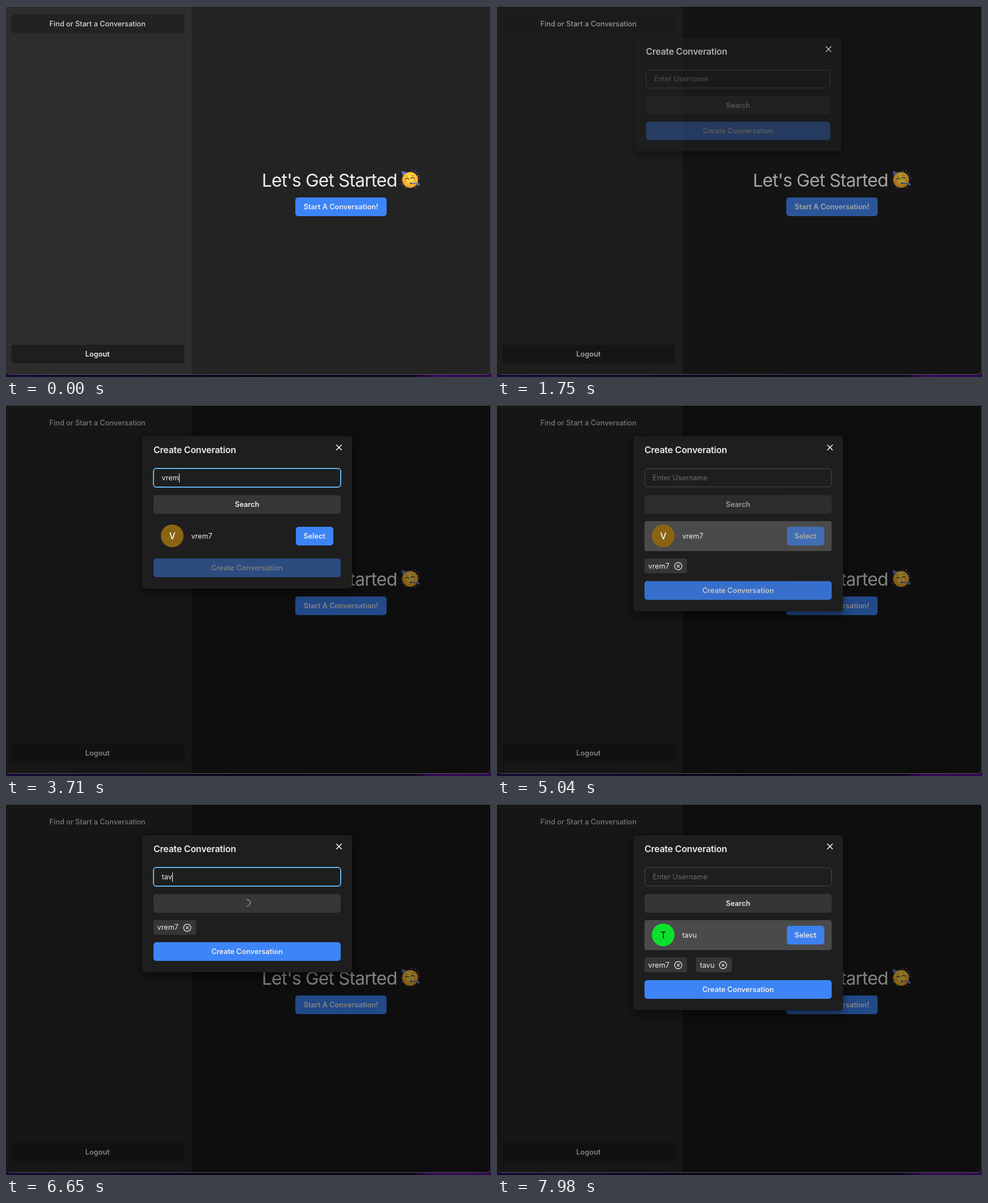
An HTML page that plays this animation: 855 by 655 pixels, repeating every 8 s.

```html
<!DOCTYPE html>
<html lang="en">
<head>
<meta charset="utf-8">
<title>Create conversation</title>
<style>
  * { box-sizing: border-box; }
  html, body { margin: 0; width: 100%; height: 100%; overflow: hidden; }
  body {
    position: relative;
    background: linear-gradient(90deg, #150b36, #0b0618 50%, #10061f 84%, #380a58 88%, #300850);
    font: 400 12.7px/1.5 Inter, sans-serif; color: #ededed; white-space: nowrap;
  }
  .abs { position: absolute; }
  .button {
    display: flex; align-items: center; justify-content: center;
    height: 33px; border-radius: 5px; font-weight: 600;
  }
  .blue { background: #3d84f7; }
  #window { left: 0; top: 0; width: 855px; height: 651px; border-radius: 0 0 8px 8px; overflow: hidden; }
  #frame { inset: 0; border: 1px solid #555; border-left: 0; border-radius: 0 3px 8px 8px; }
  #sidebar { left: 0; top: 0; width: 326.5px; height: 651px; }
  #sidebar .button { left: 9px; width: 304.5px; }
  #find { top: 15px; font-weight: 500; color: #d9d9d9; }
  #findFill { left: 9px; top: 15px; width: 304.5px; height: 33px; border-radius: 5px; background: #222; }
  #logout { top: 598px; background: #1e1e1e; }
  #heading { left: 451px; top: 284px; font-size: 31.7px; letter-spacing: -.026em; }
  #emoji { left: 695px; top: 288px; }
  #start { left: 510px; top: 338px; width: 161px; }
  #overlay { inset: 0; background: #000; }
  #modal {
    left: 240px; top: 55px; width: 370px; padding: 57.4px 20px 20px; border-radius: 5px; background: #1e1e1e;
    display: flex; flex-direction: column; gap: 13.2px;
    box-shadow: 0 0 0 1px #0002, 0 5px 10px #0003, 0 8px 20px #0005;
  }
  #title { left: 20px; top: 13px; font-size: 15.9px; font-weight: 600; letter-spacing: -.012em; }
  #close { left: 341px; top: 13.5px; }
  #input { height: 33px; padding-left: 13.6px; border: 1px solid; border-radius: 5px; display: flex; align-items: center; }
  #caret { width: 1px; height: 16px; margin-right: -1px; background: #fff; }
  #hint { color: #6b6b6b; }
  #search { background: #363636; }
  #spinner {
    width: 13.2px; height: 13.2px; border: 1.7px solid #d8d8d8; border-radius: 50%;
    border-bottom-color: transparent; border-left-color: transparent;
  }
  #row { height: 53px; padding: 0 13.2px; border-radius: 4px; display: flex; align-items: center; }
  #avatar {
    width: 40px; height: 40px; margin-right: 13.2px; border-radius: 50%;
    display: flex; align-items: center; justify-content: center; font-size: 15.4px; font-weight: 500;
  }
  #select { width: 66px; margin-left: auto; }
  #chips { display: flex; gap: 16.5px; }
  .chip { height: 26.5px; padding: 0 6.6px; border-radius: 4px; background: #363636; display: flex; align-items: center; gap: 7px; }
</style>
</head>
<body>
<div id="window" class="abs">
  <div id="sidebar" class="abs">
    <div id="findFill" class="abs"></div>
    <div id="find" class="abs button">Find or Start a Conversation</div>
    <div id="logout" class="abs button">Logout</div>
  </div>
  <div id="heading" class="abs">Let's Get Started</div>
  <svg id="emoji" class="abs" width="36" height="36" fill="none" stroke-linecap="round">
    <defs><radialGradient id="face" cy=".4"><stop offset=".5" stop-color="#ffd54a"/><stop offset="1" stop-color="#f0a526"/></radialGradient></defs>
    <circle cx="17.5" cy="19" r="14" fill="url(#face)"/>
    <path d="M2 3 12 6Q7 8 5 13Z" fill="#4d66c8"/>
    <path d="M6 4.500 4 8M9 6 5 10" stroke="#91a8f0"/>
    <path d="M9 18q3-4 6 0M19 16.500q3-4 6 0" stroke="#6b4015" stroke-width="1.5"/>
    <path d="M10 13q1-1 3-1M20 11q2-1 3 0" stroke="#a8701f"/>
    <circle cx="9" cy="22" r="2.500" fill="#f58a3c" opacity=".5"/>
    <circle cx="26" cy="20" r="2" fill="#f58a3c" opacity=".5"/>
    <circle cx="18.500" cy="25" r="1.700" fill="#7a431c"/>
    <path d="M20 25 30 25.500" stroke="#5a74cc" stroke-width="2.200"/>
    <path d="M30 25q4 0 3 3-2 1-3-1" stroke="#7594df" stroke-width="1.500"/>
    <path d="M20 3h1M30 7l1 1M34 16v1M3 26v1M9 33h1" stroke="#4d72df" stroke-width="1.500"/>
    <path d="M26 3l1 1M32 12h1M3 19v1M27 33h1" stroke="#dc5140" stroke-width="1.500"/>
  </svg>
  <div id="start" class="abs button">Start A Conversation!</div>
  <div id="overlay" class="abs"></div>
  <div id="modal" class="abs">
    <div id="title" class="abs">Create Converation</div>
    <svg id="close" class="abs" width="12" height="12"><path d="M1.200 1.200l9.600 9.600m0-9.600l-9.600 9.600" stroke="#fff" stroke-width="1.5"/></svg>
    <div id="input"><span id="typed"></span><span id="caret"></span><span id="hint">Enter Username</span></div>
    <div id="search" class="button"><span id="searchLabel">Search</span><span id="spinner"></span></div>
    <div id="row"><span id="avatar"></span><span id="name"></span><span id="select" class="button">Select</span></div>
    <div id="chips"></div>
    <div id="create" class="button blue">Create Conversation</div>
  </div>
  <div id="frame" class="abs"></div>
</div>
<script>
const LOOP = 8000;
const $ = Object.fromEntries([...document.querySelectorAll('[id]')].map(el => [el.id, el]));

const USERS = [
  { name: 'vrem7', color: '#8a6413', ink: '#fff' },
  { name: 'tavu', color: '#0be12c', ink: '#182018' },
];
const OPEN = 1640;
// One entry per search: key presses, loading span, press on Select, participant added.
const SEARCHES = [
  { query: 'vrem', keys: [3150, 3290, 3430, 3560], load: 3600, found: 3700, press: 4800, added: 4960 },
  { query: 'tav', keys: [6020, 6160, 6300], load: 6594, found: 6850, press: 7800, added: 7975 },
];
const FOCUS = [2440, 5375];
const CARET_RESETS = [...FOCUS, ...SEARCHES.flatMap(s => s.keys)];

const BLUE = [61, 132, 247], SLATE = [72, 88, 114];
const IDLE = [72, 72, 72], HOVER = [98, 98, 98], RING = [99, 179, 237];
const PANEL = [35, 35, 35], PANEL_DIM = [26, 26, 26];
const SIDEBAR = [45, 45, 45], SIDEBAR_DIM = [40, 40, 40];

const within = (t, from, to) => t >= from && t < to;
const ramp = (t, start, length = 200) => {
  const x = Math.min(1, Math.max(0, (t - start) / length));
  return 1 - (1 - x) ** 2;
};
const pulse = (t, on, off) => ramp(t, on) - ramp(t, off);
const mix = (a, b, k) => a.map((v, i) => v + (b[i] - v) * k);
const rgb = (c, alpha = 1) => `rgba(${c.map(Math.round)},${alpha})`;
const show = (el, visible) => { el.style.display = visible ? '' : 'none'; };
const setText = (el, text) => { if (el.textContent !== text) el.textContent = text; };

const chips = USERS.map(user => {
  const chip = document.createElement('div');
  chip.className = 'chip';
  chip.innerHTML = `${user.name}<svg width="17" height="17" fill="none" stroke="#eee" stroke-width="1.2">
    <circle cx="8.5" cy="8.5" r="6.4"/><path d="M6.2 6.2l4.600 4.600m0-4.600l-4.600 4.600"/></svg>`;
  $.chips.append(chip);
  return chip;
});

function drawPage(t) {
  const opened = ramp(t, OPEN, 250);
  $.overlay.style.opacity = opened * .45;
  $.window.style.background = rgb(mix(PANEL, PANEL_DIM, opened));
  $.sidebar.style.background = rgb(mix(SIDEBAR, SIDEBAR_DIM, opened));
  $.findFill.style.opacity = 1 - opened;
  $.start.style.background = rgb(mix(BLUE, SLATE, pulse(t, 1270, OPEN)));
  show($.modal, opened > 0);
  $.modal.style.opacity = opened;
  $.modal.style.transform = opened < 1 ? `scale(${.95 + .05 * opened})` : '';
}

function drawInput(t) {
  const active = SEARCHES.find(s => within(t, s.keys[0], s.added));
  const text = active ? active.query.slice(0, active.keys.filter(k => t >= k).length) : '';
  setText($.typed, text);
  show($.hint, !text);

  const sinceReset = t - Math.max(...CARET_RESETS.filter(k => t >= k));
  const focused = SEARCHES.some((s, i) => within(t, FOCUS[i], s.press));
  $.caret.style.opacity = focused && sinceReset % 1000 < 500 ? 1 : 0;

  const hover = ramp(t, 2245, 80) - ramp(t, 4800) + pulse(t, 5300, 7800);
  const ring = SEARCHES.reduce((sum, s, i) => sum + pulse(t, FOCUS[i], s.press), 0);
  $.input.style.borderColor = rgb(mix(mix(IDLE, HOVER, hover), RING, ring));
  $.input.style.boxShadow = `0 0 0 ${ring}px ${rgb(RING, ring)}`;
}

function drawResults(t) {
  const loading = SEARCHES.find(s => within(t, s.load, s.found));
  show($.searchLabel, !loading);
  show($.spinner, loading);
  if (loading) $.spinner.style.transform = `rotate(${(t - loading.load) / 450 * 360}deg)`;
  const enabled = SEARCHES.reduce((sum, s) => sum + pulse(t, s.keys[0], s.added), 0);
  $.search.style.opacity = .4 + .6 * enabled;

  const index = t < SEARCHES[1].load ? 0 : 1;
  const user = USERS[index], search = SEARCHES[index];
  show($.row, t >= search.found);
  setText($.name, user.name);
  setText($.avatar, user.name[0].toUpperCase());
  $.avatar.style.background = user.color;
  $.avatar.style.color = user.ink;
  $.row.style.background = within(t, 4200, 5320) || t >= 7280 ? '#4a4a4a' : '';
  $.select.style.background = rgb(mix(BLUE, SLATE, pulse(t, search.press - 380, search.press)));
  $.select.style.opacity = 1 - .6 * ramp(t, search.added);

  chips.forEach((chip, i) => show(chip, t >= SEARCHES[i].added));
  show($.chips, t >= SEARCHES[0].added);
  $.create.style.opacity = .45 + .55 * ramp(t, SEARCHES[0].added);
}

const startTime = performance.now();
function frame() {
  const t = (performance.now() - startTime) % LOOP;
  drawPage(t);
  drawInput(t);
  drawResults(t);
  requestAnimationFrame(frame);
}
frame();
</script>
</body>
</html>
```
